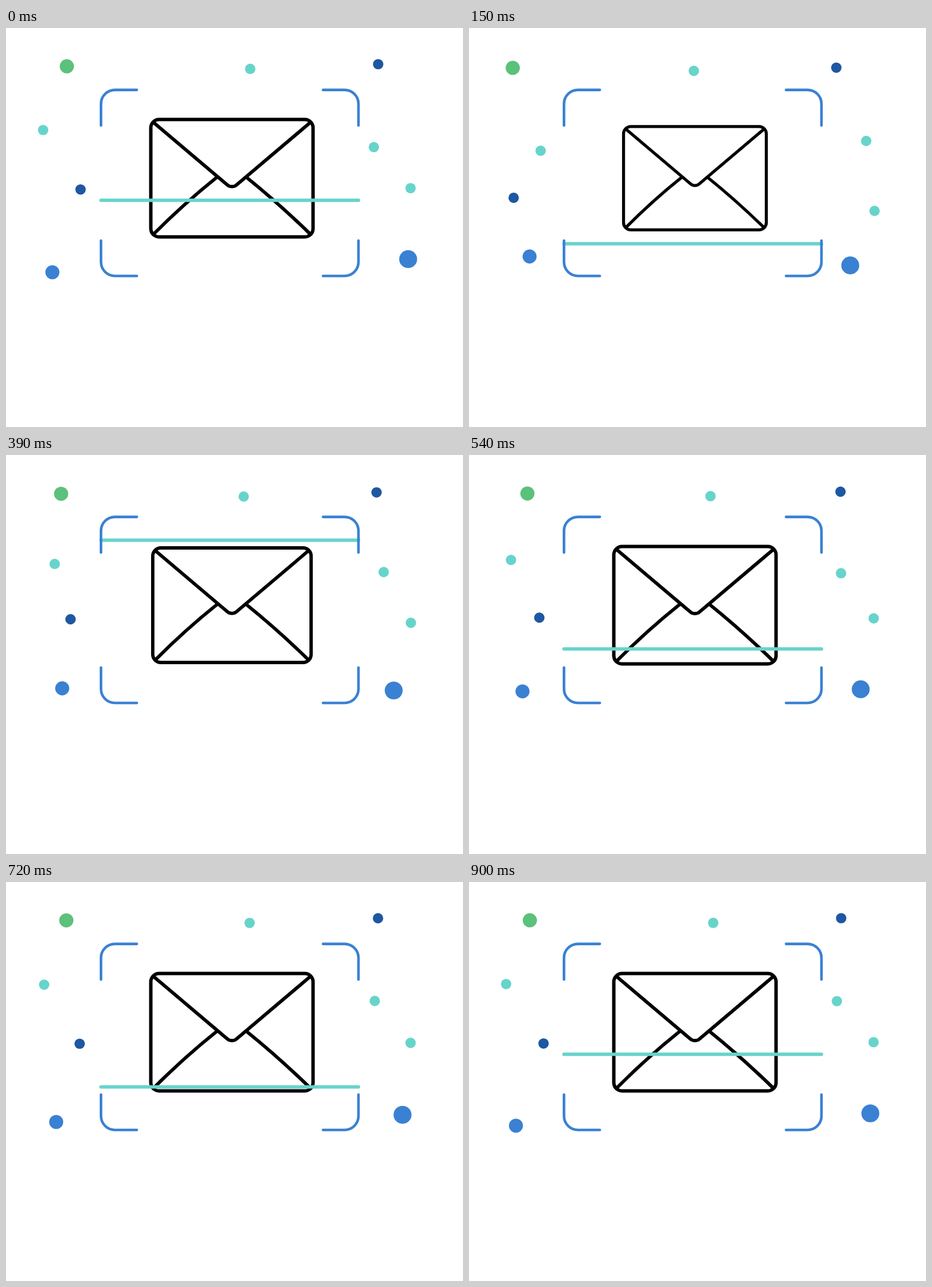
An HTML page for the animation above (0.93 s loop, 800 by 700 pixels).

```html
<!DOCTYPE html>
<html lang="en">
<head>
<meta charset="utf-8">
<title>Mail scan</title>
<style>
  html, body { margin: 0; width: 100%; height: 100%; overflow: hidden; background: #fff; }
  svg { display: block; width: 100vw; height: 100vh; }
  path, rect, line { fill: none; stroke-linecap: round; stroke-linejoin: round; }
  #mail { stroke: #000; stroke-width: 6; }
  #scan { stroke: #67d4cb; stroke-width: 6; }
  #corners { stroke: #3a81d3; stroke-width: 4.6; }
</style>
</head>
<body>
<svg viewBox="0 0 800 700">
  <g id="dots"></g>
  <g id="mail">
    <rect x="253.5" y="160.5" width="284" height="206" rx="14.5"/>
    <path d="M258 165.5L386.5 274.5C391.5 279.5 399.5 279.5 404.5 274.5L533 165.5"/>
    <path d="M369 262Q311.5 308 258 362M421 262Q479 309 533 362"/>
  </g>
  <line id="scan" x1="166.3" x2="617"/>
  <path id="corners" d="M166.3 171V133A24.5 24.5 0 0 1 190.8 108.6H229
    M555 108.6H592.5A24.5 24.5 0 0 1 617 133V171
    M617 373V410.5A24.5 24.5 0 0 1 592.5 435H555
    M229 435H190.8A24.5 24.5 0 0 1 166.3 410.5V373"/>
</svg>
<script>
const LOOP = 930, TICK = 30;
const TEAL = '#67d4cb', NAVY = '#1e57a2', BLUE = '#3a81d3', GREEN = '#5bc17b';
const $ = id => document.getElementById(id);

// resting x, y, radius, colour, starting offset dx, dy, linear motion
const dots = [
  [106.5, 67.2, 12.4, GREEN, -42, 3.8],
  [427.5, 71.7, 9.1, TEAL, -47.6, 4.9],
  [651.5, 63.5, 9.1, NAVY, -11.9, 8.5],
  [65, 179, 9.1, TEAL, 84.8, 51],
  [130.5, 283.3, 9.1, NAVY, -73.5, 20.5],
  [644, 209, 9.1, TEAL, 72, -15.2],
  [708.2, 281, 9.1, TEAL, 2.4, 56],
  [81.2, 428.5, 12.3, BLUE, 28.7, -31.9, true],
  [704, 405.5, 15.7, BLUE, -42.2, 12.7, true]
].map(([x, y, r, fill, dx, dy, linear]) => {
  const el = document.createElementNS('http://www.w3.org/2000/svg', 'circle');
  el.setAttribute('r', r);
  el.setAttribute('fill', fill);
  $('dots').append(el);
  return { el, x, y, dx, dy, linear };
});

const bezier = (a, b, s) => 3 * s * (1 - s) ** 2 * a + 3 * s * s * (1 - s) * b + s ** 3;

function ease(u) {
  if (u >= 1) return 1;
  let lo = 0, hi = 1;
  for (let i = 0; i < 24; i++) {
    const mid = (lo + hi) / 2;
    if (bezier(0.2, 0.28, mid) < u) lo = mid; else hi = mid;
  }
  return bezier(0.32, 1, lo);
}

// Linear interpolation through [time, value] keys
function track(keys, t) {
  const i = keys.findIndex(k => k[0] >= t);
  if (i < 0) return keys[keys.length - 1][1];
  if (i === 0) return keys[0][1];
  const [t0, v0] = keys[i - 1], [t1, v1] = keys[i];
  return v0 + (v1 - v0) * (t - t0) / (t1 - t0);
}

const scanKeys = [[30, 302.3], [150, 378.5], [390, 149.5], [570, 378.5], [660, 378.5], [900, 302.3]];
const scaleKeys = [[30, 1], [150, 0.88], [450, 1]];

function draw(now) {
  const t = Math.floor(now % LOOP / TICK) * TICK;
  const age = (t || LOOP) - TICK;
  const left = 1 - ease(age / 870), leftLinear = 1 - age / 900;

  for (const d of dots) {
    const k = d.linear ? leftLinear : left;
    d.el.setAttribute('cx', d.x + d.dx * k);
    d.el.setAttribute('cy', d.y + d.dy * k);
  }
  const y = track(scanKeys, t);
  $('scan').setAttribute('y1', y);
  $('scan').setAttribute('y2', y);
  $('mail').setAttribute('transform',
    `translate(395.5 263.5) scale(${track(scaleKeys, t)}) translate(-395.5 -263.5)`);
}

let start;
function frame(now) {
  start ??= now;
  draw(now - start);
  requestAnimationFrame(frame);
}
draw(0);
requestAnimationFrame(frame);
</script>
</body>
</html>
```
